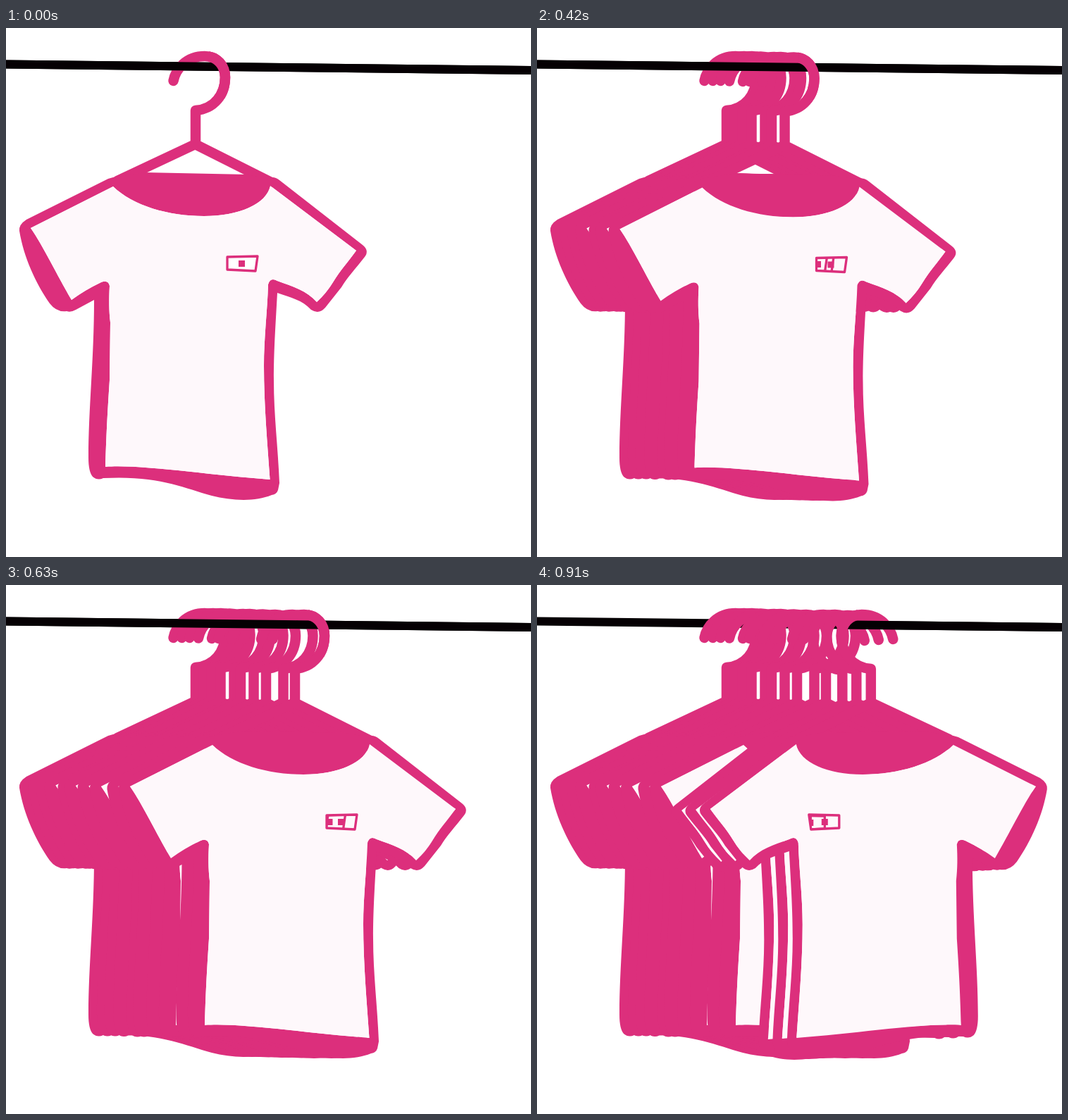
Recreate the animation shown at these times as an HTML page with a canvas. Size 745x751 px, loop 0.98 s.

```html
<!DOCTYPE html>
<html lang="en">
<head>
<meta charset="utf-8">
<title>Shirts on a rail</title>
<style>
  html, body { margin: 0; width: 100%; height: 100%; overflow: hidden; background: #fff; }
  canvas { display: block; }
</style>
</head>
<body>
<canvas id="stage" width="745" height="751"></canvas>
<script>
const ctx = document.getElementById('stage').getContext('2d');
const PINK = '#dc2f7c';
const CLOTH = '#fef8fb';
const HANGER_WIDTH = 14.5;
const STEP = 70;
const STEPS = 14;

const outline = `M152 212 L196 205 L342 208 L364 212 L378 212 Q383 212 388 216
  L506 308 Q516 316 509 325 C496 342 485 353 476 368 L453 397
  Q444 407 433 400 C420 386 405 383 385 376
  C382 430 380 460 380 500 C380 550 386 595 388 646
  L386 656 Q384 662 377 663 C353 673 320 671 292 664
  C250 652 215 635 138 639 Q130 643 123 637 Q117 630 117 610
  C117 540 125 470 125 386 L99 400 Q92 404 86 402
  Q72 404 62 391 C42 362 25 325 19 288 Q18 279 29 272 L145 214 Z`;

const panel = `M152 225 C180 252 230 267 281 267 C330 267 370 250 375 224
  L497 316 C485 333 474 344 464 361 Q455 376 441 389
  C427 373 407 367 385 359 Q375 353 372 364
  C371 400 366 440 366 480 C366 535 371 590 374.5 641
  C290 635 190 619 141 623 C142 590 143 560 147 500
  L148 418 C146 400 146 385 147 366 Q145 357 135 361 Q112 372 93 386
  C72 350 53 310 35 284 Z`;

const badge = 'M314 325 L357 324 L354 345 L314 343 Z';
const arcCurve = 'C300 40 311 54 311 70 C311 95 295 115 269 117';

const border = new Path2D(outline + panel);
const cloth = new Path2D(panel + badge);
const badgeEdge = new Path2D(badge);
const hanger = new Path2D(`M237.5 75 C241 58 256 40 282 40 ${arcCurve}
  L269 165 M158 217 L268.5 165 L376 219`);
const hookArc = new Path2D('M282 40 ' + arcCurve);

const facingRight = [[0, 0], [12, 0], [23, 0], [35.5, 0.5], [54.5, 1],
  [64, 1], [82.5, 1.5], [100, 2], [124.5, 2], [141, 2]];
const facingLeft = [[0, 4], [20, 3], [40.5, 2]];
const shirts = [
  ...facingRight.map(([x, y]) => ({ x, y, flip: 1 })),
  ...facingLeft.map(([x, y]) => ({ x: 702.3 + x, y, flip: -1 }))
];

function placed(shirt, draw) {
  ctx.save();
  ctx.translate(shirt.x, shirt.y);
  ctx.scale(shirt.flip, 1);
  draw();
  ctx.restore();
}

function stroke(path, width) {
  ctx.strokeStyle = PINK;
  ctx.lineWidth = width;
  ctx.stroke(path);
}

function drawShirt() {
  stroke(hanger, HANGER_WIDTH);
  ctx.fillStyle = PINK;
  ctx.fill(border, 'evenodd');
  ctx.fillStyle = CLOTH;
  ctx.fill(cloth, 'evenodd');
  stroke(badgeEdge, 3.3);
  ctx.fillStyle = PINK;
  ctx.fillRect(330, 330, 9, 9);
}

function drawRail(left) {
  ctx.save();
  ctx.beginPath();
  ctx.rect(left, 0, 745 - left, 100);
  ctx.clip();
  ctx.beginPath();
  ctx.moveTo(0, 51.4);
  ctx.lineTo(745, 60);
  ctx.lineCap = 'square';
  ctx.strokeStyle = '#050003';
  ctx.lineWidth = 12;
  ctx.stroke();
  ctx.restore();
}

// The rail passes through the newest hook: over its tip, under its bend.
function drawHookBend() {
  ctx.beginPath();
  ctx.rect(288, 20, 60, 80);
  ctx.clip();
  stroke(hookArc, HANGER_WIDTH);
}

function render(step) {
  const visible = shirts.slice(0, step + 1);
  const newest = visible[visible.length - 1];
  const lastStep = step === STEPS - 1;
  ctx.fillStyle = '#fff';
  ctx.fillRect(0, 0, 745, 751);
  ctx.lineCap = ctx.lineJoin = 'round';
  drawRail(0);
  visible.forEach(shirt => placed(shirt, drawShirt));
  drawRail(lastStep ? newest.x - 311 : 0);
  placed(newest, drawHookBend);
}

const start = performance.now();
function tick() {
  const elapsed = performance.now() - start;
  render(Math.floor(elapsed / STEP) % STEPS);
  requestAnimationFrame(tick);
}
tick();
</script>
</body>
</html>
```
